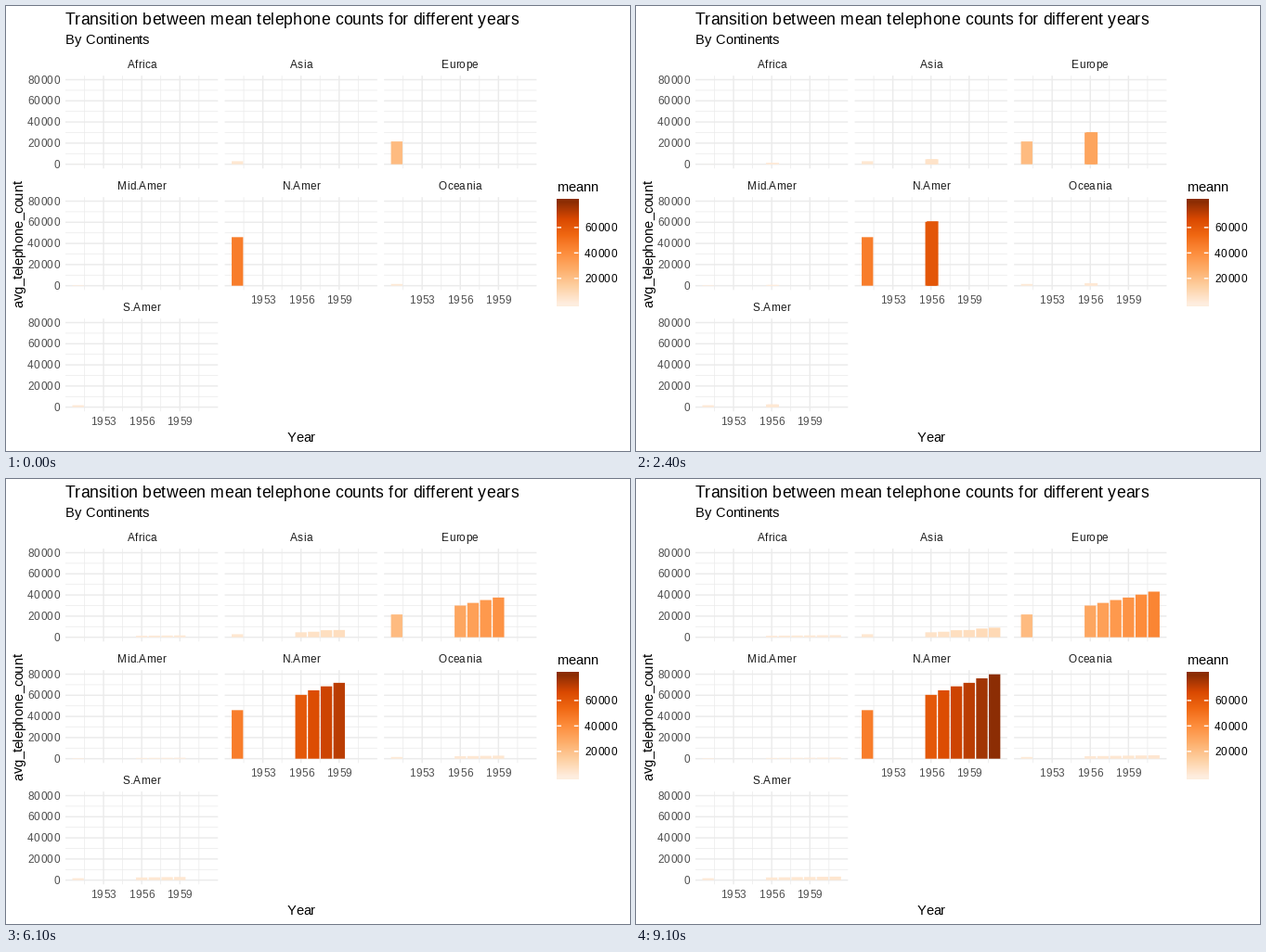
Recreate the animation shown at these times as a matplotlib script. Size 672 by 480 pixels, loop 10000 ms.

```python
import numpy as np
import matplotlib.pyplot as plt
from matplotlib.animation import FuncAnimation
from matplotlib.patches import Rectangle
from matplotlib.textpath import TextPath

WIDTH, HEIGHT, DPI = 672, 480, 100
FRAMES, INTERVAL = 100, 100

# Mean telephone counts (WorldPhones data set), one column per continent
YEARS = [1951, 1956, 1957, 1958, 1959, 1960, 1961]
REGIONS = ["N.Amer", "Europe", "Asia", "S.Amer", "Oceania", "Africa", "Mid.Amer"]
COUNTS = np.array([
    [45939, 21574, 2876, 1815, 1646, 89, 555],
    [60423, 29990, 4708, 2568, 2366, 1411, 733],
    [64721, 32510, 5230, 2695, 2526, 1546, 773],
    [68484, 35218, 6662, 2845, 2691, 1663, 836],
    [71799, 37598, 6856, 3000, 2868, 1769, 911],
    [76036, 40341, 8220, 3145, 3054, 1905, 1008],
    [79831, 43173, 9053, 3338, 3224, 2005, 1076],
])
LOW, HIGH = COUNTS.min(), COUNTS.max()

# First frame and number of steps of each move between two years
MOVES = [(8, 8), (24, 8), (40, 7), (55, 7), (70, 7), (85, 7)]

# Panel layout in pixels, y pointing down
PANEL_X, PANEL_W, STEP_X = 64.0, 164.24, 171.57
ZERO_Y, PANEL_H, STEP_Y = 170.7, 100.1, 131.0
PX_YEAR = PANEL_W / 11.99
PX_COUNT = PANEL_H / (1.1 * HIGH)
BAR_W = 0.9 * PX_YEAR

PALETTE = ["#FEEDDE", "#FDD0A2", "#FDAE6B", "#FD8D3C", "#F16913", "#D94801", "#8C2D04"]

TO_XYZ = np.array([[0.4124, 0.3576, 0.1805],
                   [0.2126, 0.7152, 0.0722],
                   [0.0193, 0.1192, 0.9505]])
WHITE = TO_XYZ.sum(axis=1)


def rgb_to_lab(rgb):
    rgb = np.asarray(rgb, float)
    linear = np.where(rgb > 0.04045, ((rgb + 0.055) / 1.055) ** 2.4, rgb / 12.92)
    xyz = linear @ TO_XYZ.T / WHITE
    f = np.where(xyz > 0.008856, np.cbrt(xyz), 7.787 * xyz + 16 / 116)
    x, y, z = np.moveaxis(f, -1, 0)
    return np.stack([116 * y - 16, 500 * (x - y), 200 * (y - z)], axis=-1)


def lab_to_rgb(lab):
    l, a, b = np.moveaxis(np.asarray(lab, float), -1, 0)
    y = (l + 16) / 116
    f = np.stack([y + a / 500, y, y - b / 200], axis=-1)
    xyz = np.where(f > 0.2069, f ** 3, (f - 16 / 116) / 7.787) * WHITE
    linear = np.clip(xyz @ np.linalg.inv(TO_XYZ).T, 0, 1)
    rgb = np.where(linear > 0.0031308, 1.055 * linear ** (1 / 2.4) - 0.055, 12.92 * linear)
    return np.clip(rgb, 0, 1)


STOPS = rgb_to_lab([[int(c[i:i + 2], 16) / 255 for i in (1, 3, 5)] for c in PALETTE])


def ramp_lab(t):
    """Position on the palette (0 to 1) as a Lab colour."""
    where = np.linspace(0, 1, len(STOPS))
    return np.stack([np.interp(t, where, STOPS[:, i]) for i in range(3)], axis=-1)


FILLS = ramp_lab((COUNTS - LOW) / (HIGH - LOW))

plt.rcParams["font.family"] = "Liberation Sans"
fig = plt.figure(figsize=(WIDTH / DPI, HEIGHT / DPI), dpi=DPI, facecolor="white")
ax = fig.add_axes([0, 0, 1, 1])
ax.axis("off")

# Text: every glyph advances by whole pixels
TITLE, BODY, SMALL = 17.6, 14.667, 11.733
ink_cache = {}


def ink(chars):
    """Width in em of the characters set between two bars."""
    if chars not in ink_cache:
        ink_cache[chars] = TextPath((0, 0), f"|{chars}|", size=100).get_extents().width / 100
    return ink_cache[chars]


def pens(text, size):
    """Pen position of each glyph, followed by the total width."""
    bars = ink("")
    places = [0]
    for i, ch in enumerate(text):
        advance = round((ink(ch) - bars) * size)
        if i + 1 < len(text):
            after = text[i + 1]
            kern = ink(ch + after) - ink(ch) - ink(after) + bars
            advance += round(kern * size)
        places.append(places[-1] + advance)
    return places


def label(x, y, text, size, color="black", align=0.0, upright=False):
    places = pens(text, size)
    start = round(x - align * places[-1])
    for ch, pen in zip(text, places):
        if ch == " ":
            continue
        px, py = (x, y - pen) if upright else (start + pen, y)
        ax.text(px, py, ch, size=size * 72 / DPI, color=color, ha="left", va="baseline",
                rotation=90 if upright else 0, rotation_mode="anchor")


def line(xs, ys, color, width, order):
    ax.plot(xs, ys, color=color, lw=width * 72 / DPI, solid_capstyle="butt",
            snap=False, zorder=order)


def draw_panel(name, col, row):
    """Grid and labels of one panel; returns its left edge and zero line."""
    left, zero = PANEL_X + col * STEP_X, ZERO_Y + row * STEP_Y
    right, bottom = left + PANEL_W, zero + 0.05 * HIGH * PX_COUNT
    top = bottom - PANEL_H
    grid = "#EBEBEB"
    for count in range(0, 80001, 10000):
        y = zero - count * PX_COUNT
        major = count % 20000 == 0
        line([left, right], [y, y], grid, 1.42 if major else 0.71, 1 + major)
        if major and col == 0:
            label(58, round(y + 4.0), str(count), SMALL, "#4D4D4D", align=1)
    for i in range(7):
        year = 1951.5 + 1.5 * i
        x = left + (year - 1950.005) * PX_YEAR
        major = year in (1953, 1956, 1959)
        line([x, x], [top, bottom], grid, 1.42 if major else 0.71, 1 + major)
        if major and (row == 2 or row == 1 and col > 0):
            label(x, round(bottom + 15), f"{year:.0f}", SMALL, "#4D4D4D", align=0.5)
    label(left + PANEL_W / 2, 67 + row * STEP_Y, name, SMALL, "#1A1A1A", align=0.5)
    return left, zero


def add_bar(left, zero, order):
    bar = Rectangle((left, zero), BAR_W, 0, linewidth=0, snap=False, zorder=order)
    ax.add_patch(bar)
    return bar


def set_bar(bar, left, zero, year, count, lab):
    bar.set_x(left + (year - 1950.455) * PX_YEAR)
    bar.set_y(zero - count * PX_COUNT)
    bar.set_height(count * PX_COUNT)
    bar.set_facecolor(lab_to_rgb(lab))


def draw_legend():
    left, right, top, bottom = 593.4, 616.44, 208.8, 324.0
    bins = 20
    t = (np.linspace(0, bins, 231) - 0.5) / (bins - 1)
    strip = lab_to_rgb(ramp_lab(np.clip(t, 0, 1)))[:, None, :]
    ax.imshow(strip, extent=(left, right, bottom, top), origin="lower",
              aspect="auto", interpolation="nearest", zorder=2)
    label(593, 200, "meann", BODY)
    for count in (20000, 40000, 60000):
        share = (0.5 + (bins - 1) * (count - LOW) / (HIGH - LOW)) / bins
        y = bottom - share * (bottom - top)
        tick = (right - left) / 5
        line([left, left + tick], [y, y], "white", 1.42, 3)
        line([right - tick, right], [y, y], "white", 1.42, 3)
        label(623, round(y + 4.2), str(count), SMALL)


label(64, 20, "Transition between mean telephone counts for different years", TITLE)
label(64, 41, "By Continents", BODY)
label(317.9, 470, "Year", BODY, align=0.5)
label(18, 325, "avg_telephone_count", BODY, upright=True)
draw_legend()

panels = []
for i, name in enumerate(sorted(REGIONS)):
    left, zero = draw_panel(name, i % 3, i // 3)
    region = REGIONS.index(name)
    marks = []
    for k, year in enumerate(YEARS[:-1]):
        mark = add_bar(left, zero, 4)
        set_bar(mark, left, zero, year, COUNTS[k, region], FILLS[k, region])
        marks.append(mark)
    panels.append((left, zero, region, marks, add_bar(left, zero, 5)))

ax.set_xlim(0, WIDTH)
ax.set_ylim(HEIGHT, 0)


def mix(values, state, t):
    return values[state] + (values[state + 1] - values[state]) * t


def update(frame):
    begun = sum(frame >= first for first, _ in MOVES)
    state, t = 0, 0.0
    if begun:
        state = begun - 1
        first, steps = MOVES[state]
        t = min((frame - first + 1) / steps, 1)
    year = mix(YEARS, state, t)
    for left, zero, region, marks, mover in panels:
        for k, mark in enumerate(marks):
            mark.set_visible(k < begun)
        set_bar(mover, left, zero, year, mix(COUNTS[:, region], state, t),
                mix(FILLS[:, region], state, t))
    return []


anim = FuncAnimation(fig, update, frames=FRAMES, interval=INTERVAL,
                     repeat=True, repeat_delay=0, blit=False)
plt.show()
```
